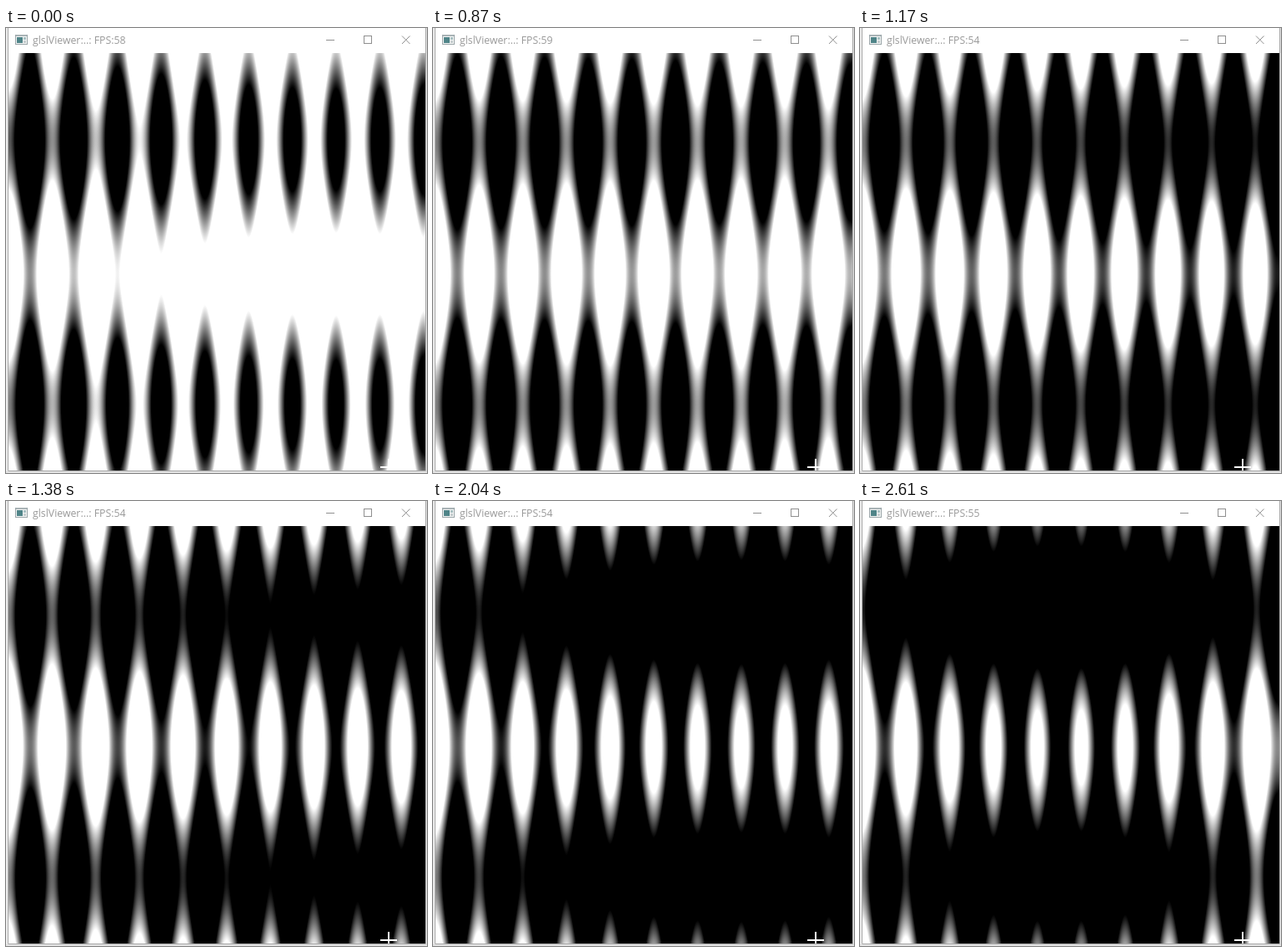
An HTML page with a canvas for the animation above (2.71 s loop, 505 by 533 pixels).

```html
<!DOCTYPE html>
<html lang="en">
<head>
<meta charset="utf-8">
<title>Shader window</title>
<style>
  html, body { margin: 0; width: 100%; height: 100%; overflow: hidden; background: #fff; }
  #stage { position: relative; width: 505px; height: 533px; overflow: hidden; }
  canvas { position: absolute; left: 3px; top: 30px; }
  svg { position: absolute; left: 0; top: 0; }
  text { font: 12.3px "Open Sans", "Noto Sans", sans-serif; fill: #999; }
</style>
</head>
<body>
<div id="stage">
  <canvas id="view" width="500" height="500"></canvas>
  <svg width="505" height="533" viewBox="0 0 505 533" fill="none">
    <defs>
      <linearGradient id="below" x1="0" y1="0" x2="0" y2="1">
        <stop offset="0" stop-color="#d8d8d8"/>
        <stop offset="1" stop-color="#ececec"/>
      </linearGradient>
    </defs>
    <!-- window edge and shadow -->
    <rect x="0" y="0" width="2" height="533" fill="#ececec"/>
    <rect x="504" y="0" width="1" height="533" fill="#e2e2e2"/>
    <rect x="0" y="531" width="505" height="2" fill="url(#below)"/>
    <path d="M2.5 0V530.5H503.5V0" stroke="#aaa"/>
    <!-- window icon -->
    <rect x="11.5" y="8.5" width="14" height="11" fill="#f4f6f6" stroke="#9aa5a8"/>
    <rect x="12" y="8" width="13" height="2" fill="#a9b3b6"/>
    <rect x="13" y="11" width="7" height="7" fill="#4f8488"/>
    <rect x="21" y="11" width="3" height="3" fill="#a9c0c2"/>
    <rect x="21" y="15" width="3" height="3" fill="#c5cdce"/>
    <text id="title" x="32" y="19"></text>
    <!-- window buttons -->
    <g stroke="#8f8f8f">
      <path d="M384 14.5H394"/>
      <rect x="429.5" y="9.5" width="9" height="9"/>
      <path d="M475 9.5L484.5 19M484.5 9.5L475 19"/>
    </g>
    <!-- mouse cross -->
    <path d="M449 526H469M459 516V530" stroke="#fff" stroke-width="2"/>
  </svg>
</div>
<script>
const SIZE = 500, LOOP = 2710;
const ctx = document.getElementById('view').getContext('2d');
const title = document.getElementById('title');
const image = ctx.createImageData(SIZE, SIZE);
const pixels = new Uint32Array(image.data.buffer);
const across = new Float32Array(SIZE), up = new Float32Array(SIZE);

// Screen refresh times, from waits counted in 30 ms ticks.
const starts = [0];
for (const ticks of '3232323' + '23' + '2222332' + '3' + '2223222' + '3' + '2323232' + '2' + '323') {
  starts.push(starts[starts.length - 1] + 30 * ticks);
}

function fps(ms) {
  if (ms < 90) return 58;
  if (ms < 1080) return 59;
  return ms < 2070 ? 54 : 55;
}

// Plasma: the brightness is a sum of a column term and a row term.
function paint(ms) {
  const t = 1.036 * (ms / 1000 - 0.97);
  const drift = 10 * Math.sin(t / 5);
  const fx = 60 * Math.cos(t / 25), fy = 10 * Math.cos(t / 12);
  for (let i = 0; i < SIZE; i++) {
    const p = (i + 0.5) / SIZE;
    across[i] = Math.cos(p * fx) - Math.sin(p * drift);
    up[i] = 0.5 * Math.cos(p * drift / 2) - Math.sin(p * fy);
  }
  for (let row = 0, n = 0; row < SIZE; row++) {
    const base = up[SIZE - 1 - row];
    for (let x = 0; x < SIZE; x++) {
      const v = Math.round(255 * Math.min(1, Math.max(0, base + across[x])));
      pixels[n++] = 0xff000000 | v * 0x010101;
    }
  }
  ctx.putImageData(image, 0, 0);
  title.textContent = 'glslViewer:..: FPS:' + fps(ms);
}

let shown = -1;
const begin = performance.now();

function tick() {
  const ms = (performance.now() - begin) % LOOP;
  let now = 0;
  for (const s of starts) if (s <= ms) now = s;
  if (now !== shown) paint(shown = now);
  requestAnimationFrame(tick);
}
tick();
</script>
</body>
</html>
```
